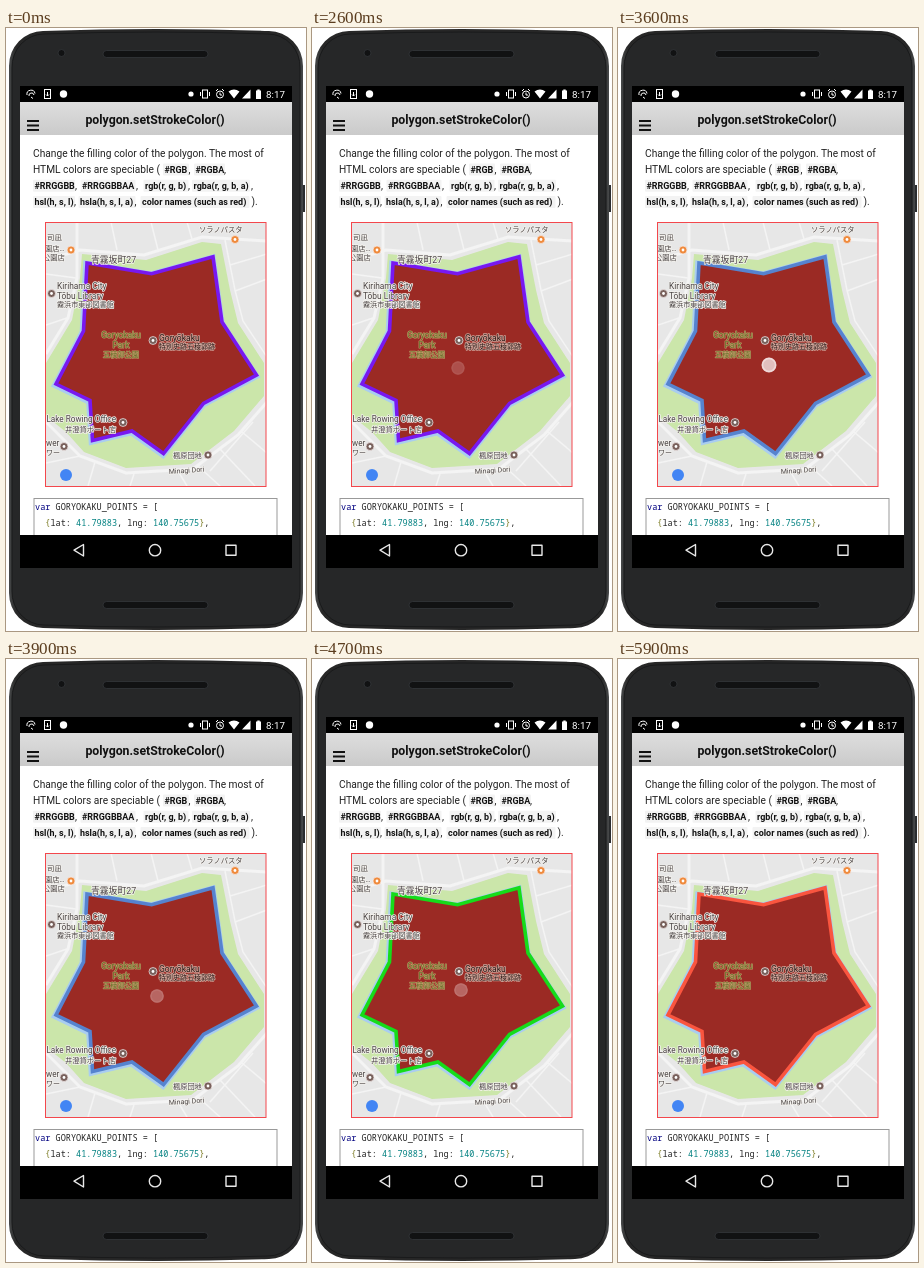
An HTML page that plays this animation: 300x603 px, repeating every 7900 ms.

```html
<!DOCTYPE html>
<html lang="en">
<head>
<meta charset="utf-8">
<title>Polygon stroke colour</title>
<style>
  html, body { margin: 0; width: 100%; height: 100%; overflow: hidden; background: #fff; }
  svg { display: block; width: 300px; height: 603px; }
  text { font-family: Roboto, "Noto Sans CJK JP", "Noto Sans CJK", sans-serif; white-space: pre; }
  .copy { font-size: 10.2px; fill: #222; }
  .chip { font-size: 8.95px; font-weight: 700; fill: #111; }
  .code { font-family: "Noto Sans Mono", "DejaVu Sans Mono", monospace; font-size: 8.55px; fill: #222; }
  .label { paint-order: stroke; stroke: #f4f2ee; stroke-width: 1.6px; stroke-linejoin: round; fill: #4a4444; }
  .onfill { stroke: #cfa79c; fill: #2a1614; }
  .park { stroke: #c09a68; stroke-width: 1.2px; fill: #66702a; }
</style>
</head>
<body>
<svg viewBox="0 0 300 603">
  <defs>
    <linearGradient id="shell" x2="1" y2="0">
      <stop offset="0" stop-color="#47494a"/>
      <stop offset=".025" stop-color="#272727"/>
      <stop offset=".975" stop-color="#272727"/>
      <stop offset="1" stop-color="#47494a"/>
    </linearGradient>
    <linearGradient id="bar" x2="0" y2="1">
      <stop offset="0" stop-color="#dedede"/>
      <stop offset="1" stop-color="#cacaca"/>
    </linearGradient>
    <clipPath id="mapClip"><rect x="40" y="195" width="220" height="263"/></clipPath>
    <clipPath id="pageClip"><rect x="14" y="107" width="272" height="400"/></clipPath>
  </defs>

  <!-- phone -->
  <path d="M296 157h3v27h-3z" fill="#2b2d2f"/>
  <path d="M3 38A34 35 0 0 1 37 3Q150 -1 263 3A34 35 0 0 1 297 38V565A34 35 0 0 1 263 600Q150 604 37 600A34 35 0 0 1 3 565Z" fill="url(#shell)"/>
  <path d="M6 40A32 33 0 0 1 38 6Q150 2 262 6A32 33 0 0 1 294 40V563A32 33 0 0 1 262 597Q150 601 38 597A32 33 0 0 1 6 563Z" fill="#262728" stroke="#191a1b"/>
  <g fill="#111213" stroke="#34373a" stroke-width=".8">
    <rect x="97" y="22.500" width="105" height="7" rx="3.500"/>
    <rect x="97" y="573.500" width="105" height="7" rx="3.500"/>
    <circle cx="55.500" cy="25" r="3.500"/>
  </g>
  <rect x="14" y="58" width="272" height="482"/>
  <rect x="14" y="107" width="272" height="400" fill="#fff"/>

  <!-- status bar -->
  <g fill="none" stroke="#fff">
    <path d="M21 67a4 4 0 0 1 8-1.500M23 68a2.300 2.300 0 0 1 5-1M25 69l2 1.500"/>
    <rect x="38.500" y="61.500" width="6" height="9"/>
    <path d="M41.500 64v4M40 66.500l1.500 1.500 1.500-1.500"/>
    <rect x="196.500" y="62" width="5" height="8"/>
    <path d="M194.500 64v4M203.500 64v4"/>
    <circle cx="214" cy="66.500" r="3.500"/>
    <path d="M214 64.500v2.500h2M210 63l2-2M218 63l-2-2"/>
  </g>
  <g fill="#fff">
    <circle cx="57.500" cy="66" r="3.700"/>
    <circle cx="185" cy="66" r="2.600"/>
    <path d="M222.500 63.500Q228 59.500 233.500 63.500L228 70.500ZM236 70.500h8.500V61.500ZM250 62.500h1.300v-1h2.400v1h1.300v8.500h-5z"/>
    <text x="260" y="70" font-size="9.800">8:17</text>
  </g>

  <!-- header -->
  <rect x="14" y="74" width="272" height="33" fill="url(#bar)"/>
  <path d="M21 93h12M21 97.500h12M21 102h12" stroke="#111" stroke-width="2.200"/>
  <text x="149" y="95.700" text-anchor="middle" font-size="12.300" font-weight="700" fill="#111">polygon.setStrokeColor()</text>

  <g id="copy"></g>

  <!-- map -->
  <g clip-path="url(#mapClip)">
    <rect x="40" y="194" width="221" height="265" fill="#e7e7e7"/>
    <path d="M76 226L140 232 196 214 215 216 224 262 232 295 258 335V368L228 403 185 436 120 440 78 424 60 404 40 388V335L66 292 74 250Z" fill="#cbe6aa"/>
    <g fill="none" stroke="#f4f4f4">
      <path d="M40 232L74 222 138 227 196 209 262 213M71 194V250L62 290 40 326M40 394L74 428 120 445 187 441 232 407 261 374" stroke-width="3"/>
      <path d="M105 194L111 222M145 194L152 222M181 194L186 211M219 212L229 262 237 293 261 329M224 237L261 226M229 263L261 251M40 297L61 290M40 246L70 250M89 434L82 458M128 446L124 458M172 443L181 458M192 438L214 458M214 421L249 458M236 404L261 425M40 435L74 428M204 443L247 394" stroke-width="1.500"/>
    </g>
    <path id="moat" fill="none" stroke="#a9cdf0" stroke-width="6.500" transform="translate(-.6 1)"/>
    <path id="star" fill="#9b2a24" stroke-width="3.600"/>
    <g id="places"></g>
    <circle cx="60" cy="447" r="6" fill="#4285f4"/>
    <g id="touch">
      <circle r="7.500" fill="#e8cccc"/>
      <circle r="6.500" fill="none" stroke="#f8eaea" stroke-width="1.400"/>
    </g>
  </g>
  <rect x="39.500" y="194.500" width="220.500" height="264" fill="none" stroke="#f3474c"/>

  <!-- code -->
  <g clip-path="url(#pageClip)">
    <rect x="28" y="470.500" width="243" height="50" fill="#fff" stroke="#999"/>
    <text class="code" x="29" y="482"><tspan fill="#000080">var</tspan> GORYOKAKU_POINTS = [</text>
    <text class="code" x="39.300" y="498"><tspan fill="#7a7a20">{</tspan>lat: <tspan fill="#008080">41.79883</tspan>, lng: <tspan fill="#008080">140.75675</tspan><tspan fill="#7a7a20">}</tspan>,</text>
  </g>

  <!-- navigation -->
  <g fill="none" stroke="#e8e8e8" stroke-width="1.400" stroke-linejoin="round">
    <path d="M77.500 516.500V528L68 522.200Z"/>
    <circle cx="149" cy="522.200" r="5.700"/>
    <rect x="220" y="517.200" width="10" height="10"/>
  </g>
</svg>

<script>
const $ = id => document.getElementById(id);

function add(parent, tag, attrs, text) {
  const el = document.createElementNS('http://www.w3.org/2000/svg', tag);
  for (const key in attrs) el.setAttribute(key, attrs[key]);
  if (text) el.textContent = text;
  return parent.appendChild(el);
}

// Description: shaded code chips, then plain runs on top
function chip(x, y, width, s) {
  add($('copy'), 'rect', { x: x - 1.5, y: y - 9, width: width + 3, height: 12, rx: 1, fill: '#f3f3f3' });
  add($('copy'), 'text', { x, y, class: 'chip' }, s);
}
const plain = (x, y, s) => add($('copy'), 'text', { x, y, class: 'copy' }, s);
const rows = [128.5, 144.5, 160.8, 177];
chip(158.5, rows[1], 23, '#RGB');
chip(189.5, rows[1], 28, '#RGBA');
chip(28.5, rows[2], 39, '#RRGGBB');
chip(76, rows[2], 52, '#RRGGBBAA');
chip(139, rows[2], 42, 'rgb(r, g, b)');
chip(187.5, rows[2], 55, 'rgba(r, g, b, a)');
chip(28.5, rows[3], 39, 'hsl(h, s, l)');
chip(74, rows[3], 54, 'hsla(h, s, l, a)');
chip(136, rows[3], 106, 'color names (such as red)');
plain(27, rows[0], 'Change the filling color of the polygon. The most of');
plain(27, rows[1], 'HTML colors are speciable (');
[182.5, 218].forEach(x => plain(x, rows[1], ','));
[69, 130, 182, 245].forEach(x => plain(x, rows[2], ','));
[68, 128.5].forEach(x => plain(x, rows[3], ','));
plain(245.5, rows[3], ').');

// Map labels and pins
function place(x, y, size, s, cls = '', extra = {}) {
  add($('places'), 'text', { x, y, 'font-size': size, class: 'label ' + cls, ...extra }, s);
}
function pin(cx, cy, fill = '#78605b') {
  add($('places'), 'circle', { cx, cy, r: 4, fill, stroke: '#f6eeee', 'stroke-width': .7 });
  add($('places'), 'circle', { cx, cy, r: 1.4, fill: '#fff' });
}
const mid = { 'text-anchor': 'middle' };
const right = { 'text-anchor': 'end' };
const orange = '#ef8a3c';
place(193, 204, 7.3, 'ソラノパスタ');
place(41, 212, 7.4, '司凪');
place(39, 223, 7.2, '園店…');
place(37, 232, 7.2, '公園店');
place(85, 234.5, 8.8, '青霧坂町27');
place(51, 260.5, 8.4, 'Kirihama City');
place(51, 270.5, 8.4, 'Tōbu Library');
place(51, 279, 7.1, '霧浜市東部図書館');
place(115, 310, 8.4, 'Goryokaku', 'park', mid);
place(115, 319.5, 8.4, 'Park', 'park', mid);
place(115, 328.5, 7.2, '五稜郭公園', 'park', mid);
place(153, 312.5, 8.6, 'Goryōkaku', 'onfill');
place(153, 321, 7, '特別史跡五稜郭跡', 'onfill');
place(110, 394, 8.2, 'Lake Rowing Office', '', right);
place(110, 403.5, 7.3, '井澄貸ボート店', '', right);
place(40, 418, 8.2, 'wer');
place(40, 427, 7, 'ワー');
place(167, 430, 7.2, '楓原団地');
place(163, 446, 7, 'Minagi Dori', '', { transform: 'rotate(-4 163 446)' });
pin(229, 211.5, orange);
pin(65, 222, orange);
pin(45.5, 265.5);
pin(147, 312.5);
pin(117, 394.5);
pin(58, 418.5);
pin(202, 427);

// Star outline
const outline = 'M81 235L145.600 245.700 207 228.800 216 294 250.500 347 197.500 375.500 157.500 425.500 126 403 86.500 412.500 84 372.500 50 356 77.500 303Z';
$('moat').setAttribute('d', outline);
$('star').setAttribute('d', outline);

// Each tap shows a fading dot and, once it is gone, a new stroke
const taps = [
  { x: 146, y: 340, show: 2200, fade: 2300, gone: 2700, recolor: 2800, stroke: '#5683cf' },
  { x: 151, y: 337, show: 3600, fade: 3600, gone: 4100, recolor: 4100, stroke: '#16dc1a' },
  { x: 149, y: 331, show: 4400, fade: 4400, gone: 4900, recolor: 4900, stroke: '#f66a4a' },
  { x: 151, y: 328, show: 5400, fade: 5400, gone: 5800, recolor: 5800, stroke: '#fa553f' }
];
const firstStroke = '#7818f0';
const loop = 7900;
const step = 100;

function draw(now) {
  const t = Math.floor(now % loop / step) * step;
  const done = taps.findLast(tap => t >= tap.recolor);
  $('star').setAttribute('stroke', done ? done.stroke : firstStroke);

  const tap = taps.find(tap => t >= tap.show && t < tap.gone);
  const left = tap ? Math.min(1, (tap.gone - t) / (tap.gone - tap.fade)) : 0;
  $('touch').setAttribute('opacity', .92 * left);
  if (tap) $('touch').setAttribute('transform', `translate(${tap.x} ${tap.y}) scale(${.85 + .15 * left})`);
}

const start = performance.now();
function tick() {
  draw(performance.now() - start);
  requestAnimationFrame(tick);
}
tick();
</script>
</body>
</html>
```
